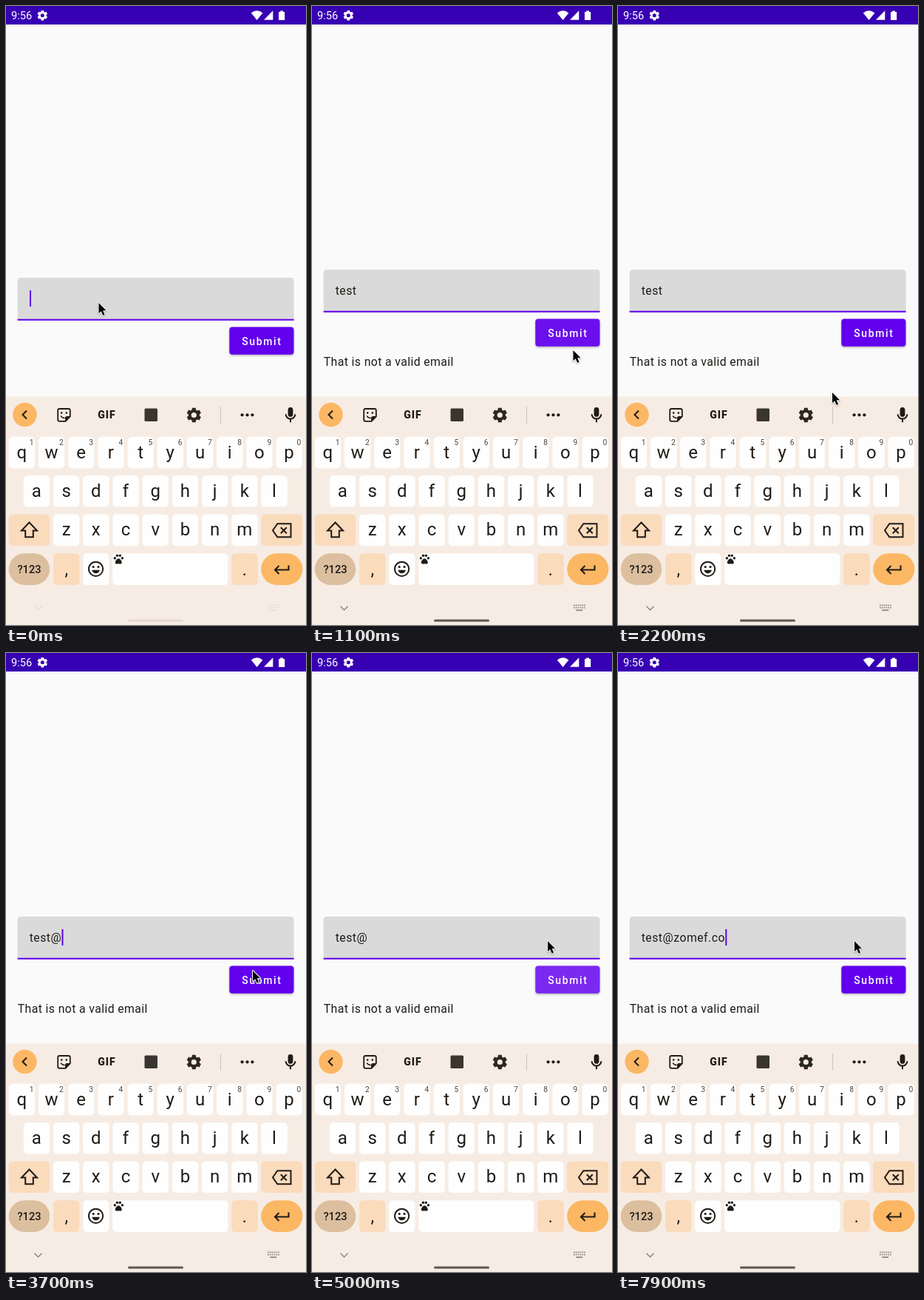
An HTML page with a canvas that plays this animation: 406 px wide and 836 px high, repeating every 8 s.

```html
<!DOCTYPE html>
<html lang="en">
<head>
<meta charset="utf-8">
<title>Email form</title>
<style>
html, body { margin: 0; width: 100%; height: 100%; overflow: hidden; background: #fafafa; }
canvas { display: block; width: 406px; height: 836px; }
</style>
</head>
<body>
<canvas id="stage"></canvas>
<script>
const W = 406, H = 836, LOOP = 8000;
const canvas = document.getElementById('stage');
const c = canvas.getContext('2d');
const dpr = window.devicePixelRatio || 1;
canvas.width = W * dpr;
canvas.height = H * dpr;

const INK = '#1f1b17', PURPLE = '#6200ee', PEACH = '#fadbbc', ORANGE = '#fbb764';
const FONT = 'Roboto, "Noto Sans", sans-serif';

// time and text after each keystroke
const EMAIL = 'test@zomef.co';
const STROKES = [150, 260, 380, 500, 3300, 5100, 5160, 5220, 5280, 5340, 5400, 7500, 7650];
const CLICKS = [720, 4640];
const MESSAGE_AT = 860;
// mouse: time, x, y
const MOUSE = [
  [0, 125.5, 401], [420, 125.5, 401], [700, 346, 445], [880, 346, 445], [1080, 353.5, 465],
  [1250, 353.5, 465], [1750, 290, 522], [3250, 290, 522], [3650, 334, 429],
  [4740, 334, 429], [4950, 319, 389], [5050, 319, 389], [5100, 320, 389]
];

const clamp = v => Math.max(0, Math.min(1, v));
const ease = v => v * v * (3 - 2 * v);

function box(x, y, w, h, r, fill) {
  c.beginPath();
  c.roundRect(x, y, w, h, r);
  c.fillStyle = fill;
  c.fill();
}

function dot(x, y, r, fill) {
  c.beginPath();
  c.arc(x, y, r, 0, 7);
  c.fillStyle = fill;
  c.fill();
}

function line(d, width, color = INK) {
  c.strokeStyle = color;
  c.lineWidth = width;
  c.stroke(new Path2D(d));
}

function shape(d, fill) {
  c.fillStyle = fill;
  c.fill(new Path2D(d));
}

function text(s, x, y, size, { weight = 400, color = INK, align = 'left', gap = 0 } = {}) {
  c.font = `${weight} ${size}px ${FONT}`;
  c.letterSpacing = gap + 'px';
  c.textAlign = align;
  c.fillStyle = color;
  c.fillText(s, x, y);
  return c.measureText(s).width;
}

function gear(x, y, r, color) {
  c.beginPath();
  for (let i = 0; i < 6; i++) {
    const a = i * Math.PI / 3 + Math.PI / 6;
    for (const [off, k] of [[-0.38, 0.76], [-0.24, 1], [0.24, 1], [0.38, 0.76]])
      c.lineTo(x + r * k * Math.cos(a + off), y + r * k * Math.sin(a + off));
  }
  c.closePath();
  c.moveTo(x + r * 0.36, y);
  c.arc(x, y, r * 0.36, 0, Math.PI * 2);
  c.fillStyle = color;
  c.fill('evenodd');
}

function statusBar() {
  box(0, 0, W, 25, 0, '#3700b3');
  text('9:56', 7, 18, 14.6, { color: '#fff' });
  gear(49.3, 12.7, 7, '#fff');
  shape('M331.8 9.4Q339.6 3.2 347.4 9.4L339.6 19Z', '#fff');
  shape('M349 18.8H361.3V6.3Z', '#fff');
  shape('M369 8H371.2V6.4H375V8H377.2V19H369Z', '#fff');
}

function keyRow(letters, x, y) {
  [...letters].forEach((ch, i) => {
    const left = x + i * 40.2;
    box(left, y, 35.4, 42.5, 5.5, '#fefefe');
    text(ch, left + 17.6, y + 28.8, 24, { align: 'center' });
  });
}

function toolbar() {
  dot(25.5, 552, 16.2, ORANGE);
  line('M28 546.5L22.5 552L28 557.5', 2);

  line('M72.5 544H84.5Q86.8 544 86.8 546.3V554.5L80.5 560.8H72.5Q70.2 560.8 70.2 558.5V546.3Q70.2 544 72.5 544Z', 1.8);
  shape('M80 561.5V556.5Q80 554 82.5 554H87.5Z', INK);
  dot(75.2, 549.6, 1.3, INK);
  dot(81.8, 549.6, 1.3, INK);
  line('M74.2 553.6Q76.5 557.3 79.5 556.2', 1.7);

  text('GIF', 136.5, 557, 14, { weight: 900, align: 'center', gap: 1 });
  box(187.5, 543.5, 17.5, 17.5, 1.5, '#3b352f');
  gear(254.3, 552.5, 10, '#2c2722');
  line('M290.5 541V564', 1, '#cdc3ba');
  for (const x of [319.6, 326.5, 333.4]) dot(x, 552.3, 2.1, INK);

  box(381.6, 542, 6.8, 12.8, 3.4, INK);
  line('M378.6 551.2A6.4 6.4 0 0 0 391.4 551.2M385 557.6V562.3', 2);
}

function keyboard(navAlpha) {
  box(0, 527.5, W, H - 527.5, 0, '#f7ece3');
  toolbar();

  keyRow('qwertyuiop', 3.7, 581.8);
  for (let i = 0; i < 10; i++)
    text(String((i + 1) % 10), 34.7 + i * 40.2, 593.3, 10.3, { align: 'center', color: '#4d453d' });
  keyRow('asdfghjkl', 23.8, 634);
  keyRow('zxcvbnm', 64, 686.5);

  box(3.7, 686.5, 55.5, 42.5, 5.5, PEACH);
  line('M31.5 697.5L42 708.6H36.8V717.3H26.2V708.6H21Z', 2);
  box(345.2, 686.5, 56.2, 42.5, 5.5, PEACH);
  line('M361 708.3L367.3 699.3H385.5V717.3H367.3ZM371.8 704.3L379.8 712.3M379.8 704.3L371.8 712.3', 2);

  box(3.7, 739.2, 55.5, 42.8, 21.4, '#dcbf9f');
  text('?123', 31.5, 766.3, 14.6, { weight: 500, align: 'center' });
  box(64, 739.2, 35.4, 42.8, 5.5, PEACH);
  text(',', 81.7, 769, 23, { align: 'center' });
  box(104.2, 739.2, 35.2, 42.8, 5.5, '#fefefe');
  line('M112 760.3A9.6 9.6 0 1 0 131.2 760.3A9.6 9.6 0 1 0 112 760.3Z', 2);
  dot(118.2, 757.5, 1.6, INK);
  dot(125, 757.5, 1.6, INK);
  shape('M116.2 761.8H127Q125.2 766.3 121.6 766.3Q118 766.3 116.2 761.8Z', INK);

  box(144.2, 739.2, 156.2, 42.8, 5.5, '#fefefe');
  shape('M152.3 746.2C154.5 746.2 156.8 749.5 156.8 751.6C156.8 754.6 153.8 753.2 152.3 753.2C150.8 753.2 147.8 754.6 147.8 751.6C147.8 749.5 150.1 746.2 152.3 746.2Z', INK);
  for (const [x, y] of [[147.3, 745.8], [150.4, 742.3], [154.3, 742.3], [157.4, 745.8]]) dot(x, y, 1.7, INK);
  box(305.2, 739.2, 35.5, 42.8, 5.5, PEACH);
  text('.', 322.9, 769, 23, { align: 'center' });
  box(345.2, 739.2, 56.2, 42.8, 21.4, ORANGE);
  line('M382.5 755.5V761.5H364.5M369.5 756L364 761.5L369.5 767', 2.1);

  c.globalAlpha = navAlpha;
  line('M38.5 810.7L43.5 815.7L48.5 810.7', 1.5, '#8d857d');
  for (let i = 0; i < 6; i++) {
    box(354 + i * 2.8, 808.5, 1.7, 1.7, 0, '#8d857d');
    box(354 + i * 2.8, 811.7, 1.7, 1.7, 0, '#8d857d');
  }
  box(357.2, 815.2, 9, 1.7, 0, '#8d857d');
  box(165, 828.5, 75, 3, 1.5, '#5c5650');
  c.globalAlpha = 1;
}

function mouseAt(t) {
  const i = MOUSE.findIndex(k => k[0] > t);
  if (i < 0) return MOUSE[MOUSE.length - 1].slice(1);
  const [t0, x0, y0] = MOUSE[i - 1], [t1, x1, y1] = MOUSE[i];
  const k = ease((t - t0) / (t1 - t0));
  return [x0 + (x1 - x0) * k, y0 + (y1 - y0) * k];
}

function ripple(t, start, y) {
  const age = t - start;
  if (age < 0 || age > 540) return;
  const [x, py] = mouseAt(start);
  const fade = start === CLICKS[0] ? 120 : 260;
  const alpha = 0.24 * clamp(age / 75) * (1 - clamp((age - 260) / (fade + 40)));
  c.save();
  c.beginPath();
  c.roundRect(302.3, y, 87.2, 37.3, 4);
  c.clip();
  dot(x, py, 20 + 70 * ease(clamp(age / 225)), `rgba(255,255,255,${alpha})`);
  c.restore();
}

function form(t) {
  const shown = t >= MESSAGE_AT;
  const top = shown ? 356 : 367;
  const typed = STROKES.filter(s => s <= t);

  box(15.6, top, 374, 57.5, [4.5, 4.5, 0, 0], '#dadada');
  box(15.6, top + 55.8, 374, 2, 0, PURPLE);
  const width = text(EMAIL.slice(0, typed.length), 31.7, top + 34.4, 15.8, { gap: 0.49 });
  const last = typed.length ? typed[typed.length - 1] : 0;
  if ((t - last) % 1000 < 500) box(32 + width, top + 17, 2, 22, 0, PURPLE);

  const by = top + 66.5;
  c.save();
  c.shadowColor = 'rgba(0,0,0,0.28)';
  c.shadowBlur = 3 * dpr;
  c.shadowOffsetY = 1.5 * dpr;
  box(302.3, by, 87.2, 37.3, 4, PURPLE);
  c.restore();
  CLICKS.forEach(s => ripple(t, s, by));
  text('Submit', 319.2, by + 24, 14, { weight: 500, color: '#fff', gap: 1.65 });

  if (shown) text('That is not a valid email', 15.8, 486, 15.8, { gap: 0.39 });
}

function pointer(x, y) {
  c.save();
  c.translate(x, y);
  const arrow = new Path2D('M0 0V14.2L3.2 11.2L5.6 16.8L8.1 15.7L5.7 10.3H10.1Z');
  c.shadowColor = 'rgba(0,0,0,0.3)';
  c.shadowBlur = 2 * dpr;
  c.shadowOffsetY = dpr;
  c.lineJoin = 'round';
  c.lineWidth = 2;
  c.strokeStyle = '#fff';
  c.stroke(arrow);
  c.shadowColor = 'transparent';
  c.fillStyle = '#000';
  c.fill(arrow);
  c.restore();
}

function draw(t) {
  c.setTransform(dpr, 0, 0, dpr, 0, 0);
  box(0, 0, W, H, 0, '#fafafa');
  statusBar();
  form(t);
  keyboard(clamp(0.13 + t / 350));
  pointer(...mouseAt(t));
}

let start;
function tick(now) {
  if (start === undefined) start = now;
  draw((now - start) % LOOP);
  requestAnimationFrame(tick);
}
draw(0);
requestAnimationFrame(tick);
</script>
</body>
</html>
```
